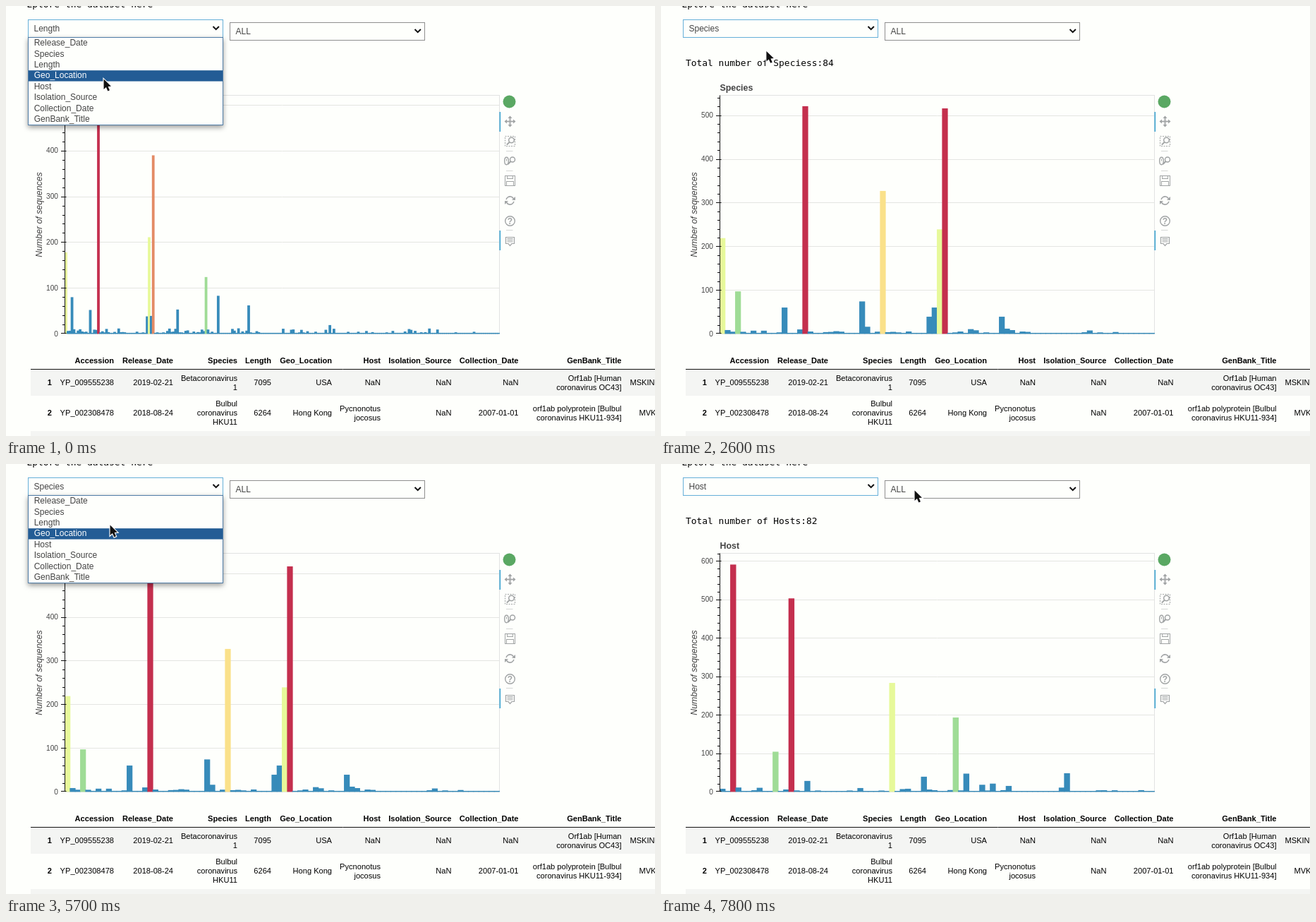
Recreate the animation shown at these times as an HTML page with a canvas. Size 920 px wide and 609 px high, loop 8000 ms.

```html
<!DOCTYPE html>
<html lang="en">
<head>
<meta charset="utf-8">
<title>Dataset dashboard</title>
<style>
html, body { margin: 0; width: 100%; height: 100%; overflow: hidden; background: #fefffc; }
canvas { display: block; width: 920px; height: 609px; }
</style>
</head>
<body>
<canvas id="stage" width="920" height="609"></canvas>
<script>
const ctx = document.getElementById('stage').getContext('2d');
const LOOP = 8000, STEP = 100, PAGE = '#fefffc', GRAY = '#a1a4a5';
const SANS = '"Liberation Sans", Arial, sans-serif';
const MONO = '12.923px "DejaVu Sans Mono", monospace';
const CHAR = 7.78, LINE = 15.7;

// Tall bars by index; the short ones between them are seeded noise.
const charts = {
  Length: { count: 214, unit: 0.648, tall: { 0: 177, 3: 79, 12: 51, 16: 497, 40: 37, 41: 210,
    42: 38, 43: 389, 55: 52, 69: 123, 75: 82, 90: 61, 130: 18 } },
  Species: { count: 84, unit: 0.6185, tall: { 0: 218, 3: 96, 12: 59, 16: 520, 27: 73, 28: 15,
    31: 326, 40: 38, 41: 59, 42: 238, 43: 515, 54: 38 } },
  Host: { count: 82, unit: 0.5443, tall: { 2: 590, 10: 103, 13: 502, 16: 27, 32: 282, 38: 38,
    44: 192, 46: 46, 49: 17, 51: 20, 54: 14, 65: 47 } }
};
const palette = ['#378bba', '#9fdc96', '#e7f99a', '#fae18a', '#e38a65', '#c42f4e'];
const fields = ['Release_Date', 'Species', 'Length', 'Geo_Location', 'Host',
  'Isolation_Source', 'Collection_Date', 'GenBank_Title'];

// ---------- timing ----------
const scenes = [
  { from: 0, view: 'Length', picked: 'Length', open: true },
  { from: 1400, view: 'Length', picked: 'Species' },
  { from: 1500, view: 'notebook', picked: 'Species', beam: true },
  { from: 1600, view: 'Species', picked: 'Species' },
  { from: 5100, view: 'Species', picked: 'Species', open: true },
  { from: 6300, view: 'Species', picked: 'Host' },
  { from: 6400, view: 'notebook', picked: 'Host', beam: true },
  { from: 6500, view: 'Host', picked: 'Host', beam: true },
  { from: 6600, view: 'Host', picked: 'Host' }
];
// start, number of steps, end point of the pointer
const moves = [
  [300, 4, 143, 78], [800, 3, 144, 71], [2600, 4, 175, 22], [3200, 1, 172, 26],
  [3500, 4, 345, 30], [4000, 2, 378, 30], [4300, 1, 390, 34], [4600, 3, 235, 25],
  [5400, 4, 147, 86], [5800, 1, 135, 107], [6000, 1, 132, 114], [7100, 8, 359, 37]
];

function pointerAt(t) {
  let x = 138, y = 103;
  for (const [start, steps, toX, toY] of moves) {
    if (t < start) break;
    const k = Math.min(1, (Math.floor((t - start) / STEP) + 1) / steps);
    const e = k * k * (3 - 2 * k);
    x += (toX - x) * e;
    y += (toY - y) * e;
  }
  return [x, y];
}

// ---------- helpers ----------
function random(seed) {
  return () => {
    seed = (seed * 1664525 + 1013904223) % 4294967296;
    return seed / 4294967296;
  };
}
function rect(x, y, w, h, fill, line) {
  if (fill) { ctx.fillStyle = fill; ctx.fillRect(x, y, w, h); }
  if (line) { ctx.lineWidth = 1; ctx.strokeStyle = line; ctx.strokeRect(x, y, w, h); }
}
function text(str, x, y, font, color = '#000', align = 'left') {
  ctx.font = font;
  ctx.fillStyle = color;
  ctx.textAlign = align;
  ctx.fillText(str, x, y);
}
function path(points, close) {
  ctx.beginPath();
  for (let i = 0; i < points.length; i += 2) ctx.lineTo(points[i], points[i + 1]);
  if (close) ctx.closePath();
}
function ink(width, color = GRAY) {
  ctx.strokeStyle = color;
  ctx.lineWidth = width;
  ctx.stroke();
}
function stroke(points, color, width = 1) {
  path(points);
  ink(width, color);
}
function fill(points, color) {
  path(points, true);
  ctx.fillStyle = color;
  ctx.fill();
}
function arc(x, y, r, from = 0, to = Math.PI * 2) {
  ctx.beginPath();
  ctx.arc(x, y, r, from, to);
}
function logo(x, y) {
  arc(x, y, 9);
  ctx.fillStyle = '#5aa863';
  ctx.fill();
}

// ---------- form controls ----------
function select(x, y, label, border) {
  rect(x, y, 276, 25, PAGE, border);
  text(label, x + 8, y + 16.5, '12px ' + SANS, '#444');
  stroke([x + 262, y + 9.5, x + 266.2, y + 13.7, x + 270.4, y + 9.5], '#111', 2);
}
function controls(dy, picked) {
  text('Eplore the dataset here', 29.5, 2 + dy, MONO);
  select(31.5, 19.5 + dy, picked, '#66afd9');
  select(317.5, 23.5 + dy, 'ALL', '#8f8f8f');
}
function menu(t, picked) {
  // The highlight runs half a step ahead of the pointer.
  const y = (pointerAt(t)[1] + pointerAt(t + STEP)[1]) / 2;
  const top = 45, row = 15.4;
  const hover = y < top ? fields.indexOf(picked) : Math.floor((y - top) / row);
  ctx.save();
  ctx.shadowColor = 'rgba(0,0,0,.4)';
  ctx.shadowBlur = 7;
  ctx.shadowOffsetY = 3;
  rect(31, 44, 277, 125, PAGE);
  ctx.restore();
  rect(31.5, 44.5, 276, 124, null, '#4e7ba6');
  fields.forEach((name, i) => {
    if (i === hover) rect(32, top + i * row, 275, row, '#235c95');
    text(name, 39.7, Math.round(top + 11.2 + i * row), '12px ' + SANS, i === hover ? '#fff' : '#444');
  });
}

// ---------- chart ----------
function barValues({ count, tall }) {
  const rand = random(count);
  return Array.from({ length: count }, (_, i) => {
    const chance = 0.6 - 0.45 * i / count;
    const small = rand() < chance ? 2 + 9 * rand() ** 2 : 1;
    return tall[i] || small;
  });
}
for (const chart of Object.values(charts)) chart.values = barValues(chart);

function plot(name) {
  const { count, unit, values } = charts[name];
  const left = 83.5, right = 699.5, top = 126.5, base = 464;
  const pitch = (right - left) / count;
  const max = Math.max(...values);
  text(`Total number of ${name}s:${count}`, 35, 85, MONO);
  text(name, left, 120, 'bold 12.4px ' + SANS, '#444');

  for (let v = 0; base - v * unit > top; v += 100) {
    const y = Math.round(base - v * unit) + 0.5;
    stroke([left, y, right, y], '#e4e5e2');
  }
  rect(left, top, right - left, base - top, null, '#e2e3e2');

  ctx.save();
  ctx.beginPath();
  ctx.rect(left, top, right - left + 0.5, base - top + 0.7);
  ctx.clip();
  values.forEach((v, i) => {
    const h = v * unit, bin = Math.min(5, Math.floor(v / max * 6));
    rect(left + i * pitch - 0.45, base - h - 0.45, pitch + 0.9, h + 0.9, palette[bin]);
  });
  ctx.restore();

  stroke([left, top, left, base], '#111');
  for (let v = 0; base - v * unit > top; v += 20) {
    const y = Math.round(base - v * unit) + (v ? 0.5 : -0.5);
    const major = v % 100 === 0;
    stroke([major ? 78 : 80, y, major ? 85.5 : left, y], '#111');
    if (major) text(v, 74, base - v * unit + 3.6, '10.15px ' + SANS, '#444', 'right');
  }
  ctx.save();
  ctx.translate(51, 295.5);
  ctx.rotate(-Math.PI / 2);
  text('Number of sequences', 0, 0, 'italic 12.3px ' + SANS, '#444', 'center');
  ctx.restore();
}

// ---------- toolbar ----------
function lens(x, y, r) {
  arc(x, y, r);
  ink(1.5);
  stroke([x - r * 0.7, y + r * 0.7, x - r * 0.7 - 4, y + r * 0.7 + 4], GRAY, 2);
}
// Each icon is drawn around its own centre.
const icons = {
  pan() {
    for (let i = 0; i < 4; i++) {
      stroke([0, 0, 0, -5], GRAY, 1.8);
      fill([-3, -4.5, 0, -8, 3, -4.5], GRAY);
      ctx.rotate(Math.PI / 2);
    }
  },
  boxZoom() {
    ctx.setLineDash([2, 1.5]);
    rect(-7, -7, 14, 14, null, GRAY);
    ctx.setLineDash([]);
    lens(2, -1.5, 3.8);
  },
  wheelZoom() {
    ctx.beginPath();
    ctx.ellipse(-5, 0, 2.8, 5.2, 0, 0, Math.PI * 2);
    ink(1.4);
    stroke([-5, -3, -5, 0], GRAY);
    lens(3.5, -2, 3.5);
  },
  save() {
    rect(-7, -7, 14, 14, null, GRAY);
    rect(-4, -7, 8, 4, null, GRAY);
    rect(-5, 1, 10, 6, null, GRAY);
  },
  reset() {
    for (let i = 0; i < 2; i++) {
      arc(0, 0, 5.6, Math.PI * 1.08, Math.PI * 1.85);
      ink(1.6);
      fill([7.5, -5.5, 7.5, -0.5, 2.5, -0.8], GRAY);
      ctx.rotate(Math.PI);
    }
  },
  help() {
    arc(0, 0, 6.8);
    ink(1.4);
    text('?', 0, 4.3, 'bold 12px ' + SANS, GRAY, 'center');
  },
  hover() {
    path([-6, -5, 6, -5, 6, 4, 2.5, 4, 0, 7, -2.5, 4, -6, 4], true);
    ink(1.2);
    for (let y = -3; y < 3; y += 2.2) stroke([-4, y, 4, y], GRAY);
  }
};
function toolbar() {
  logo(713.5, 135.5);
  for (const y of [150, 318]) rect(699.5, y, 1.6, 28, '#3ba3d0');
  for (const y of [205.5, 233.5, 317.5]) stroke([709, y, 718.5, y], '#d5d7d6');
  Object.values(icons).forEach((drawIcon, i) => {
    ctx.save();
    ctx.translate(714.5, Math.round(163 + i * 28.1) + 0.5);
    drawIcon();
    ctx.restore();
  });
}

// ---------- table ----------
const edges = [65, 153, 237, 328, 376, 462, 531, 631.5, 726.5, 872.5];
const heads = ['', 'Accession', 'Release_Date', 'Species', 'Length', 'Geo_Location', 'Host',
  'Isolation_Source', 'Collection_Date', 'GenBank_Title'];
const rows = [
  ['1', 'YP_009555238', '2019-02-21', 'Betacoronavirus|1', '7095', 'USA', 'NaN', 'NaN', 'NaN',
    'Orf1ab [Human|coronavirus OC43]'],
  ['2', 'YP_002308478', '2018-08-24', 'Bulbul|coronavirus|HKU11', '6264', 'Hong Kong',
    'Pycnonotus|jocosus', 'NaN', '2007-01-01', 'orf1ab polyprotein [Bulbul|coronavirus HKU11-934]']
];
function table() {
  const font = '11.08px ' + SANS, bold = 'bold ' + font;
  rect(35, 515, 885, 37, '#f4f5f3');
  rect(35, 602, 885, 7, '#f4f5f3');
  stroke([35, 514.5, 920, 514.5], '#111');
  heads.forEach((h, i) => text(h, edges[i], 506, bold, '#000', 'right'));
  rows.forEach((cells, r) => {
    const mid = 537 + r * 43;
    cells.forEach((cell, i) => {
      const lines = cell.split('|');
      lines.forEach((s, k) => {
        const y = mid + (k - (lines.length - 1) / 2) * 13;
        text(s, edges[i], y, i ? font : bold, '#000', 'right');
      });
    });
  });
  text('MSKINK', 884.5, 537, font);
  text('MVKN', 897.5, 580, font);
}

// ---------- notebook ----------
function cell(top, bottom, prompt, first, count, baseline) {
  rect(25.5, top, 920, bottom - top, '#f6f7f4', '#cfd0ce');
  stroke([56.5, top, 56.5, bottom], '#cfd0ce');
  text(prompt, 19.5, baseline, MONO, '#303f7f', 'right');
  for (let i = 0; i < count; i++) text(first + i, 48.5, baseline + i * LINE, MONO, '#999', 'right');
}
function scrollbar(y, end) {
  rect(57, y - 5.5, 863, 11, '#f1f2f0');
  rect(71, y - 5, end - 71, 10, '#bfc0be');
  fill([63, y, 66.5, y - 3, 66.5, y + 3], '#888');
  fill([921.5, y, 918, y - 3, 918, y + 3], '#555');
}
function code(parts, y) {
  let x = 61;
  for (const [str, color, style] of parts) {
    text(str, x, y, (style ? style + ' ' : '') + MONO, color);
    x += str.length * CHAR;
  }
}
function notebook(picked) {
  const repo = 'https://raw.githubusercontent.com/covid19-bh-machine-learning/master/master/orf1ab-pyCode/';
  cell(-30.5, 27.5, '', 2, 1, 6);
  const pip = `!pip install -r ${repo}requirements.txt`.split(/([!\-\/]+)/);
  code(pip.map((s, i) => i % 2 ? [s, '#a02bb8', 'bold'] : [s, '#000']), 6);
  scrollbar(20.5, 836);

  text("Download the dashboard script - uncomment ONLY required if you're not running from the repo",
    29.5, 73, 'bold 16.58px ' + SANS);

  cell(93.5, 196.5, '[6]:', 1, 5, 111.7);
  const mark = '#d7d8d5';
  rect(76.5, 99, 844, 17, mark);
  rect(61, 115, 859, 47, mark);
  rect(61, 162, 46.5, 16, mark);
  ['# %%bash', '# mkdir -p py', '# cd py', `# wget ${repo}py/orf1ab_dash_board.py`, '# cd ..']
    .forEach((s, i) => code([[s, '#3a8080', 'italic']], 111.7 + i * LINE));
  scrollbar(189.5, 850);

  stroke([0, 203.5, 920, 203.5], '#a9aaa8');
  cell(208.5, 267.5, '[8]:', 1, 3, 227);
  code([['from', '#1a801a', 'bold'], [' py.orf1ab_dash_board ', '#000'],
    ['import', '#1a801a', 'bold'], [' get_dashboard', '#000']], 242.7);
  code([['get_dashboard()', '#000']], 258.4);

  text('shape WITH duplicates: (3046, 13)', 29.5, 286, MONO);
  text('shape WITHOUT duplicates: (2384, 13)', 29.5, 301.7, MONO);
  logo(43, 330);
  text('BokehJS 2.0.1 successfully loaded.', 60.5, 334, '12.3px ' + SANS);
  controls(366, picked);

  stroke([0, 443.5, 920, 443.5], '#a9aaa8');
  cell(449.5, 476.5, '', 1, 1, 467.3);
  cell(488.5, 515.5, '[ ]:', 1, 1, 506);

  rect(0, 535, 920, 74, '#ededeb');
  const shade = ctx.createLinearGradient(0, 535, 0, 543);
  shade.addColorStop(0, 'rgba(0,0,0,.1)');
  shade.addColorStop(1, 'rgba(0,0,0,0)');
  rect(0, 535, 920, 8, shade);
}

// ---------- pointer ----------
function pointer(x, y, beam) {
  ctx.save();
  ctx.translate(x, y);
  if (beam) {
    for (const [color, width] of [['#fff', 3], ['#111', 1.2]]) {
      stroke([0, -5.5, 0, 5.5], color, width);
      for (const end of [-6, 6]) stroke([-2.8, end, 2.8, end], color, width);
    }
  } else {
    ctx.scale(1.12, 1.12);
    path([0.5, 0.5, 0.5, 13.5, 3.5, 10.8, 5.7, 15.6, 8, 14.6, 5.9, 9.9, 9.8, 9.6], true);
    ink(2, '#fff');
    ctx.fillStyle = '#111';
    ctx.fill();
  }
  ctx.restore();
}

function draw(t) {
  const { view, picked, open, beam } = scenes.filter(s => s.from <= t).pop();
  rect(0, 0, 920, 609, PAGE);
  if (view === 'notebook') {
    notebook(picked);
  } else {
    controls(0, picked);
    plot(view);
    toolbar();
    table();
    if (open) menu(t, picked);
  }
  pointer(...pointerAt(t), beam);
}

const begin = performance.now();
function tick() {
  draw((performance.now() - begin) % LOOP);
  requestAnimationFrame(tick);
}
tick();
</script>
</body>
</html>
```
